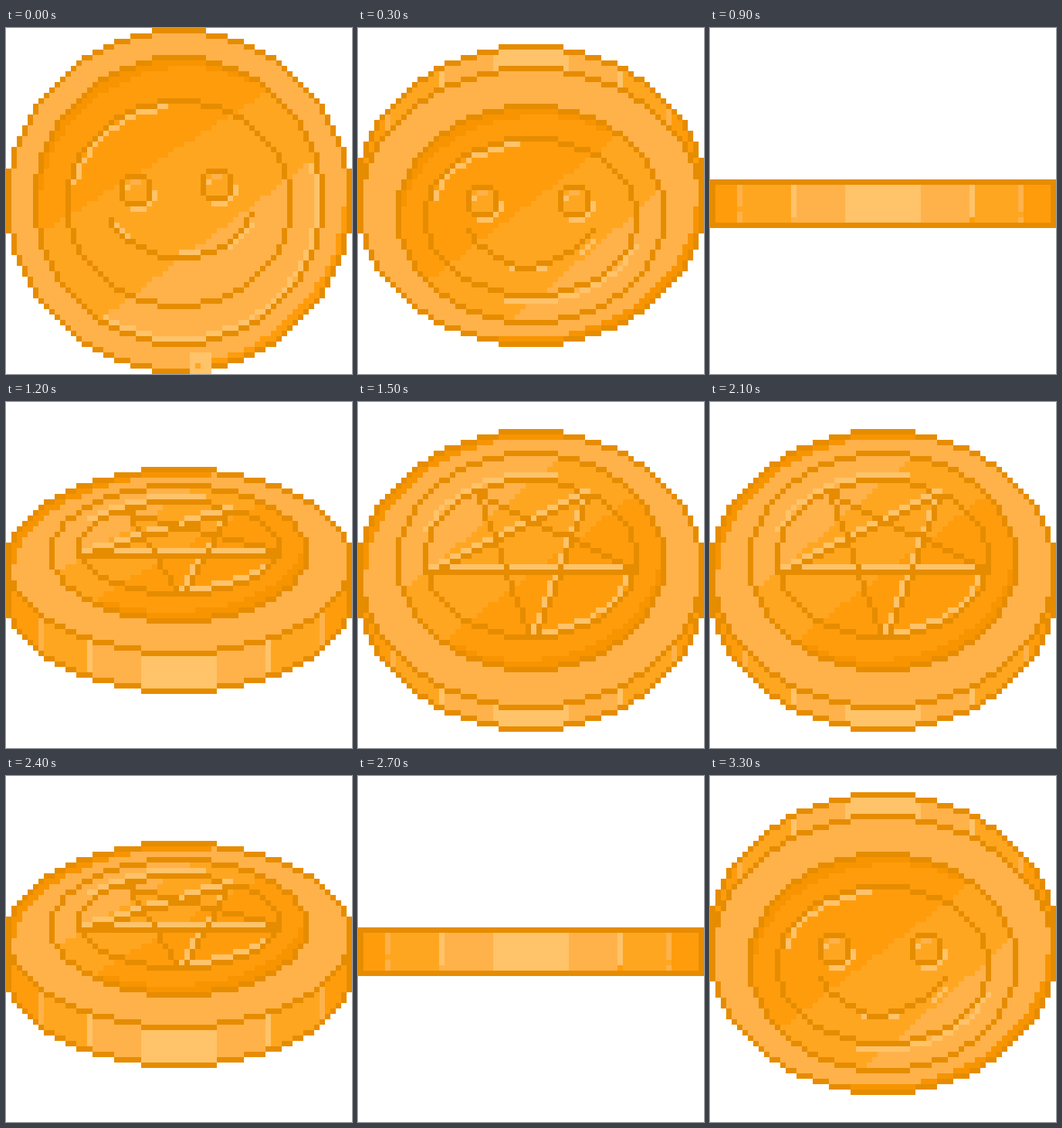
These frames come from a looping animation (512x512 px, 3.6 s). An HTML page with a canvas:

```html
<!DOCTYPE html>
<html lang="en">
<head>
<meta charset="utf-8">
<title>Flipping coin</title>
<style>
html, body { margin: 0; width: 100%; height: 100%; overflow: hidden; background: #fff; }
canvas { display: block; width: 100vw; height: 100vh; image-rendering: pixelated; }
</style>
</head>
<body>
<canvas id="coin" width="64" height="64"></canvas>
<script>
const ctx = document.getElementById('coin').getContext('2d');
const STEP = 300, SIZE = 64, MID = 31.5, ROUNDNESS = 1.96;
const LINE = '#e68c00', DARK = '#f79400', DEEP = '#ff9c0c',
      WARM = '#ffa621', LIGHT = '#ffb24a', GLOW = '#ffc369';

const oval = (cy, rx, ry) => ({ cy, rx, ry });

// Tilts from flat to steep. Tone lines are [x, y, slope].
const TILTS = [
  { depth: 0, flip: 63, face: oval(31.5, 31.5, 31.5), ring: oval(31.5, 26.5, 26.5), disc: oval(32, 20.5, 19),
    deepLine: [47, 12, .62], warmLine: [55, 25, .743], rimShade: DEEP, shadeFrom: 38,
    eyes: [[21, 27], [36, 26]], eyeHeight: 6,
    smile: [19, 35, 19, 36, 22, 39, 27, 41, 28, 42, 35, 42, 36, 41, 40, 40, 43, 37, 45, 34],
    shine: [[20, 36, 22, 38], [32, 41, 35, 41], [45, 36, 43, 38, 41, 40]] },
  { depth: 4, flip: 63, face: oval(32.5, 31.5, 25.5), ring: oval(34, 24.5, 20), disc: oval(34.5, 19.5, 14.5),
    deepLine: [47, 20, .76], warmLine: [55, 30, .86], rimShade: DARK, shadeFrom: 26,
    eyes: [[20, 29], [37, 29]], eyeHeight: 6,
    smile: [20, 37, 21, 39, 24, 41, 28, 43, 30, 44, 31, 44, 34, 43, 39, 41, 43, 37],
    shine: [[28, 44, 29, 44], [32, 44, 34, 44], [43, 39, 41, 41]] },
  { depth: 7, flip: 64, face: oval(35, 31.5, 17), ring: oval(36.5, 23.5, 12.5), disc: oval(37.5, 18.5, 8.5),
    deepLine: [47, 28, .58], warmLine: [55, 34, .6], rimShade: DARK, shadeFrom: 26,
    eyes: [[20, 33], [37, 33]], eyeHeight: 4,
    smile: [20, 39, 22, 41, 27, 43, 36, 43, 41, 41, 43, 39],
    shine: [[31, 44, 35, 44], [43, 40, 41, 42]] }
];

const inside = (o, x, y, grow = 0) =>
  Math.abs((x - MID) / (o.rx + .6 + grow)) ** ROUNDNESS +
  Math.abs((y - o.cy) / (o.ry + .44 + grow)) ** ROUNDNESS <= 1;

const onEdge = (test, x, y) =>
  test(x, y) && !(test(x - 1, y) && test(x + 1, y) && test(x, y - 1) && test(x, y + 1));

const edgeOf = (o, x, y, grow = 0) => onEdge((a, b) => inside(o, a, b, grow), x, y);

const above = ([lx, ly, slope], x, y) => y < ly + (lx - x) * slope;

function sideTone(x) {
  if (x === 5 || x === 57) return LIGHT;
  if (x === 15 || x === 48) return GLOW;
  if (x < 5 || x > 57) return DEEP;
  if (x < 15 || x > 48) return WARM;
  return x < 25 || x > 38 ? LIGHT : GLOW;
}

function shade(t, x, y, lightShift) {
  const { face, ring, disc } = t;
  if (!inside(face, x, y)) {
    const hull = (a, b) => {
      for (let k = 0; k <= t.depth; k++) if (inside(face, a, b + k)) return true;
      return false;
    };
    if (!hull(x, y)) return null;
    return onEdge(hull, x, y) ? LINE : sideTone(x);
  }
  if (edgeOf(face, x, y) || edgeOf(ring, x, y) || edgeOf(disc, x, y)) return LINE;
  if (!inside(ring, x, y)) {
    const shadow = x >= t.shadeFrom && y > face.cy - 1 && !inside(face, x + 1.5, y + 1.5);
    return shadow ? t.rimShade : LIGHT;
  }
  if (x < 46 && y < ring.cy && !inside(ring, x - 1.2, y - 2.2)) return DARK;
  if (x < 30 && y < disc.cy - 3 && edgeOf(disc, x, y, -1)) return GLOW;
  if (t.depth && x > 26 && y > disc.cy + 5 && edgeOf(disc, x, y, 1)) return GLOW;
  if (above(t.deepLine, x, y)) return DEEP;
  if (above(t.warmLine, x, y + lightShift)) return WARM;
  return !t.depth && edgeOf(ring, x, y, -1) ? GLOW : LIGHT;
}

function box(color, x, y, w = 1, h = 1) {
  ctx.fillStyle = color;
  ctx.fillRect(x, y, w, h);
}

function stroke(color, pts) {
  for (let i = 0; i + 3 < pts.length; i += 2) {
    const [x0, y0, x1, y1] = pts.slice(i, i + 4);
    const n = Math.max(1, Math.ceil(Math.max(Math.abs(x1 - x0), Math.abs(y1 - y0))));
    for (let k = 0; k <= n; k++)
      box(color, Math.round(x0 + (x1 - x0) * k / n), Math.round(y0 + (y1 - y0) * k / n));
  }
}

function drawEye(x, y, h) {
  box(GLOW, x + 2, y + h, 3);
  box(GLOW, x + 6, y + h - 3, 1, 2);
  box(GLOW, x + 5, y + h - 1);
  box(LINE, x + 1, y, 4, h);
  box(LINE, x, y + 1, 6, h - 2);
  box(WARM, x + 1, y + 1, 4, h - 2);
  box(LIGHT, x + 2, y + 1, 2);
  box(GLOW, x + 1, y + 2);
}

function drawSmiley(t) {
  t.eyes.forEach(([x, y]) => drawEye(x, y, t.eyeHeight));
  t.shine.forEach(p => stroke(GLOW, p));
  stroke(LINE, t.smile);
  if (!t.depth) {
    box(GLOW, 34, 60, 4, 4);
    box(WARM, 35, 62);
  }
}

function drawStar(t) {
  const { rx, ry } = t.disc, cy = t.flip - t.disc.cy;
  const at = (u, v) => [Math.round(MID + u * rx), Math.round(cy + v * ry)];
  const left = at(-.95, .17), right = at(.95, .17), upperRight = at(.95, .1);
  const topLeft = at(-.49, -.79), topRight = at(.52, -.79);
  const bottomLeft = at(-.02, .93), bottomRight = at(.08, .93);
  const shift = ([x, y], dx, dy) => [x + dx, y + dy];
  const line = (color, a, b) => stroke(color, [...a, ...b]);
  line(GLOW, shift(left, 1, -1), shift(right, -2, -1));
  line(GLOW, shift(left, 0, -1), shift(topRight, 0, -1));
  line(GLOW, shift(topRight, -1, 1), shift(bottomRight, -1, 0));
  line(LINE, left, right);
  line(LINE, left, topRight);
  line(LINE, topLeft, upperRight);
  line(LINE, topLeft, bottomLeft);
  line(LINE, topRight, bottomRight);
}

function drawEdge() {
  box(LINE, 0, 28, 64, 9);
  for (let x = 1; x < 63; x++) box(sideTone(x), x, 29, 1, 7);
  box(WARM, 5, 33);
  box(LIGHT, 15, 35);
  box(DEEP, 48, 35);
  box(WARM, 57, 34);
}

function drawView(view) {
  ctx.clearRect(0, 0, SIZE, SIZE);
  if (view === 3) return drawEdge();
  const tails = view > 3, t = TILTS[tails ? 6 - view : view];
  for (let y = 0; y < SIZE; y++)
    for (let x = 0; x < SIZE; x++) {
      const color = tails ? shade(t, 63 - x, t.flip - y, 1.5) : shade(t, x, y, 0);
      if (color) box(color, x, y);
    }
  if (tails) drawStar(t); else drawSmiley(t);
}

const start = performance.now();
let shown = -1;
function tick() {
  const step = Math.floor((performance.now() - start) / STEP) % 12;
  const view = step > 6 ? 12 - step : step;
  if (view !== shown) drawView(shown = view);
  requestAnimationFrame(tick);
}
tick();
</script>
</body>
</html>
```
